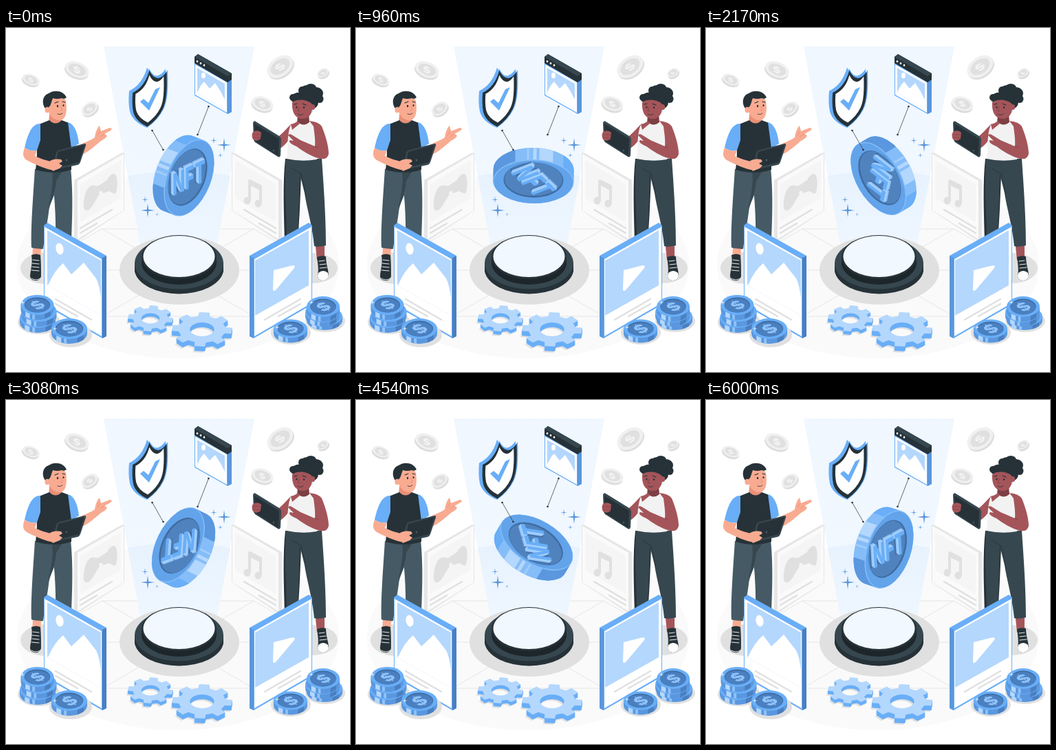
These frames come from a looping animation (500 by 500 pixels, 6040 ms). An HTML page:

```html
<!DOCTYPE html>
<html lang="en">
<head>
<meta charset="utf-8">
<title>NFT coin</title>
<style>
  html, body { margin: 0; width: 100%; height: 100%; overflow: hidden; background: #fff; }
  svg { display: block; width: 100vw; height: 100vh; }
  text { font-family: Inter, "Open Sans", sans-serif; text-anchor: middle; }
</style>
</head>
<body>
<svg id="stage" viewBox="0 0 500 500"></svg>
<script>
const PALE = '#b4d7fd', SKY = '#69aef7', MID = '#5a97de', DEEP = '#4a7fc0', NAVY = '#3f6b9f';
const INK = '#263238', SLATE = '#37474f', STEEL = '#455a64', GREY = '#e0e0e0';
const LOOP = 6040, STEPS = 145, START = 22;

const path = (d, fill, extra = '') => `<path d="${d}" fill="${fill}" ${extra}/>`;
const line = (d, color, w = 1) =>
  `<path d="${d}" fill="none" stroke="${color}" stroke-width="${w}" stroke-linecap="round" stroke-linejoin="round"/>`;
const poly = (pts, fill) => `<polygon points="${pts}" fill="${fill}"/>`;
const oval = (x, y, rx, ry, fill, extra = '') =>
  `<ellipse cx="${x}" cy="${y}" rx="${rx}" ry="${ry}" fill="${fill}" ${extra}/>`;
const group = (t, body) => `<g transform="${t}">${body}</g>`;
const mirror = body => group('translate(500 0) scale(-1 1)', body);

function floor() {
  return oval(250, 345, 234, 135, '#fafafa') +
    line('M140 292H360L470 355L360 419H140L30 355ZM140 292L360 419M360 292L140 419M30 352H470', GREY, .8);
}

function beam() {
  return path('M142 27H361L306 318H196Z', 'url(#beam)') +
    path('M177 215Q252 201 326 215L306 318H196Z', 'url(#glow)');
}

function pedestal() {
  return oval(252, 352, 87, 50, GREY) +
    path('M187 341V354A65 37 0 0 0 316 354V341Z', INK) +
    oval(251.5, 342, 64.5, 37.5, SLATE) +
    path('M197 334V341A54.5 32 0 0 0 306 341V334Z', '#1c262b') +
    oval(251.5, 333, 54.5, 32, INK) +
    oval(251.5, 332, 52, 30, '#f1f8ff');
}

function backCard(icon) {
  return poly('99,221 167,182 172,181 172,265 104,310 99,307', '#e6e6e6') +
    poly('104,222 171,183 171,265 104,307', '#fafafa') +
    poly('108,227 167,192 167,247 108,282', '#f5f5f5') +
    line('M108 291L154 264M108 298L132 284', GREY, 2.4) + icon;
}

const gamepad = path('M113 261C112 249 116 232 124 229C128 227 130 231 135 229L147 221C150 215 155 210 159 213C163 219 162 232 160 239C158 243 154 239 150 237L136 242C130 249 126 262 119 265C116 266 114 265 113 261Z', GREY) +
  oval(138, 240, 2.6, 3.2, '#f5f5f5');

const note = line('M354 251V222L370 230V254M354 226L370 234', GREY, 4) +
  oval(350.5, 251, 5, 5.5, GREY) + oval(366.5, 255, 5, 5.5, GREY);

function frontCard(icon, side) {
  return poly('55,287 60,283 146,331 146,448 140,451 55,402', SKY) +
    poly('140,334 146,331 146,448 140,451', side) +
    poly('56,289 139,336 139,448 56,400', '#fff') +
    poly('60,294 138,338 138,418 60,374', PALE) +
    line('M72 394L124 424M72 401L104 419', GREY, 2.4) + icon;
}

const landscape = oval(78, 321, 5.5, 8.5, '#fff', 'transform="rotate(-12 78 321)"') +
  path('M62 372Q70 353 83 342L95 358Q104 350 113 341L131 364Q136 373 138 394V418L60 374Z', '#fff');
const play = path('M389 352L417 345Q421 345 419 349L392 381Q388 384 388 379Z', '#fff');

// Short cylinder lying on the floor with a dollar sign on top
function token(x, y, rx, ry, h) {
  const foot = a => y + h + ry * Math.sqrt(1 - a * a);
  const stripe = (a, b, color) =>
    path(`M${x + a * rx} ${y}V${foot(a)}L${x + b * rx} ${foot(b)}V${y}Z`, color);
  return path(`M${x - rx} ${y}V${y + h}A${rx} ${ry} 0 0 0 ${x + rx} ${y + h}V${y}Z`, MID) +
    stripe(-.72, -.45, PALE) + stripe(-.3, -.15, '#8fc3fa') + stripe(.45, .8, DEEP) +
    oval(x, y, rx, ry, SKY) + oval(x, y, rx * .78, ry * .76, NAVY) + oval(x, y + .8, rx * .75, ry * .7, DEEP) +
    group(`translate(${x} ${y}) scale(1 .62) rotate(-42)`,
      `<text y="${rx * .42}" font-size="${rx * 1.12}" font-weight="800" fill="#8fc3fa">$</text>`);
}

const tokens = list => list.map(a => token(...a)).join('');

function stacks() {
  return oval(48, 428, 31, 17, GREY) + oval(94, 446, 31, 18, GREY) +
    oval(464, 426, 29, 16, GREY) + oval(414, 443, 29, 17, GREY) +
    tokens([[46, 421, 26, 15, 7], [48, 412, 25.5, 15, 7], [45.5, 402.5, 24, 14.5, 7], [92, 437, 26, 15, 7],
      [463, 419, 26, 14, 6], [460, 413, 25, 15, 6], [461, 405, 24, 15, 7], [413.5, 437, 24.5, 13.5, 7]]) +
    [[24, 399], [71, 437], [444, 399], [394, 435]].map(p => star(...p, 4, '#fff')).join('');
}

function greyCoin(x, y, rx, ry, tilt) {
  return group(`translate(${x} ${y}) rotate(${tilt})`,
    oval(0, 1.8, rx, ry, '#dcdcdc') + oval(0, -1, rx, ry, '#f0f0f0') + oval(0, -1, rx * .74, ry * .72, GREY) +
    group('scale(1 .65) rotate(-20)', `<text y="${rx * .3}" font-size="${rx}" font-weight="700" fill="#f5f5f5">$</text>`));
}

function gear(x, y, rx, ry, h, turn) {
  const ring = dy => {
    let d = '';
    for (let i = 0; i < 8; i++)
      for (const [off, r] of [[-.24, .78], [-.17, 1], [.17, 1], [.24, .78]]) {
        const a = turn + i * Math.PI / 4 + off;
        d += (d ? 'L' : 'M') + (x + rx * r * Math.cos(a)).toFixed(1) + ' ' + (y + dy + ry * r * Math.sin(a)).toFixed(1);
      }
    const hx = rx * .4, hy = ry * .4;
    return d + `ZM${x - hx} ${y + dy}a${hx} ${hy} 0 1 0 ${2 * hx} 0a${hx} ${hy} 0 1 0 ${-2 * hx} 0Z`;
  };
  let out = path(ring(h + 2), GREY, 'fill-rule="evenodd" transform="translate(-2 0)"');
  for (let dy = h; dy > 0; dy--) out += path(ring(dy), SKY, 'fill-rule="evenodd"');
  return out + path(ring(0), PALE, 'fill-rule="evenodd"');
}

function star(x, y, r, color = MID) {
  const k = r * .12;
  return path(`M${x} ${y - r}L${x + k} ${y - k}L${x + r} ${y}L${x + k} ${y + k}L${x} ${y + r}L${x - k} ${y + k}L${x - r} ${y}L${x - k} ${y - k}Z`, color);
}

function shield() {
  const d = 'M208 59Q214 71 222 71Q229 70 235 61C236 88 235 106 229 118Q221 134 205 145Q187 137 183 123C181 113 181 104 182 93Q201 84 208 59Z';
  return path(d, SKY, 'transform="translate(-3 -1.5)"') + path(d, SKY) +
    group('translate(208.8 103.5) scale(.93 .95) translate(-208.5 -103)', path(d, INK)) +
    group('translate(208.8 103.8) scale(.77 .8) translate(-208.5 -103)', path(d, '#fff')) +
    path('M195 107L200 103L207 109L217 89L224 86L208 120Z', SKY);
}

function browser() {
  return poly('274,42 279,38 328,66 328,122 322,125 274,98', SKY) +
    poly('322,70 328,66 328,122 322,125', MID) +
    poly('275,53 321,79 321,123 275,97', '#fff') +
    poly('278,58 318,81 318,118 278,94', PALE) +
    oval(287, 69, 3, 4.3, '#fff') +
    path('M278 94Q283 82 288 78L296 88L304 80Q312 91 318 104V118Z', '#fff') +
    poly('274,42 279,38 328,66 328,75 322,79 274,51', INK) +
    poly('274,42 279,38 328,66 322,70', SLATE) +
    [[278, 48.5], [283, 51.3], [288, 54.1]].map(p => oval(...p, 1.3, 1.6, '#fff')).join('');
}

function man() {
  const skin = '#f8ab91', shade = '#e98f78';
  return oval(58, 349, 37, 23, GREY) +
    path('M66 206L94 203C97 235 97 260 95 310H72C73 270 70 240 66 206Z', STEEL) +
    path('M42 205L82 207C78 232 64 250 62 268C59 290 56 305 54 321Q45 323 37 319C36 290 39 250 42 205Z', STEEL) +
    path('M67 209Q70 228 61 262Q72 240 73 222L82 208Z', SLATE) +
    path('M39 320L51 321L50 335H38Z', skin) +
    path('M37 330Q44 327 50 330C51 342 51 350 51 361Q49 368 42 367Q35 366 35 360C36 350 39 341 37 330Z', INK) +
    line('M39 337L48 338M38 342L48 343M38 347L48 348M37 352L48 353M37 364Q43 368 50 364', '#fff', .9) +
    path('M104 172C114 166 124 163 129 159C130 152 133 144 136 142L138 150L151 145Q156 146 152 149L143 154C150 156 146 160 138 164C130 171 122 178 113 183L100 184Z', skin) +
    line('M137 150L133 156M143 154L137 158', shade, .8) +
    path('M64 118L62 136Q72 145 81 135L79 126Z', shade) +
    path('M48 140L63 134Q72 143 81 134L94 139C98 160 95 180 95 206Q70 214 43 206C47 180 43 160 48 140Z', INK) +
    path('M90 137C100 140 104 152 106 168L95 175Z', SKY) +
    path('M50 139C38 139 32 152 27 174Q36 180 45 178L50 163Z', SKY) +
    path('M27 174C23 185 25 190 34 194C46 200 58 205 69 207L73 196C60 193 50 190 42 186L45 178Q36 180 27 174Z', skin) +
    path('M75 178L114 168Q117 168 116 171L108 195Q107 198 104 199L71 206Q67 207 68 203L73 181Z', SLATE) +
    path('M76 180L114 170L106 195L71 204Z', INK) + oval(88, 192, 1.4, 1.4, STEEL) +
    path('M62 195C67 190 74 190 80 191L82 194L77 197L82 200L78 204L68 208Z', skin) +
    path('M59 106C62 97 84 97 87 106C89 119 88 131 80 134C69 135 60 127 59 106Z', skin) +
    path('M58 118C51 110 53 98 62 95C70 89 84 91 88 101Q85 104 81 102Q74 104 68 102C66 107 65 113 63 114L61 118Z', INK) +
    oval(60, 119, 3.5, 4.2, skin) +
    oval(75, 113.5, 1.2, 1.7, INK) + oval(83.5, 112.5, 1.1, 1.6, INK) +
    line('M71 109L76 107M82 107L86 108', INK, 1.1) + line('M80 114L82 119L79 120', shade) +
    line('M75 125Q79 127 82 124', INK, .8);
}

function woman() {
  const skin = '#a4555a', shade = '#7d3f44';
  return oval(446, 349, 36, 22, GREY) +
    path('M406 190L430 192C428 230 428 260 424 310H405C404 270 402 225 406 190Z', INK) +
    path('M410 190L459 190C461 220 465 270 465 316Q456 320 448 317C445 285 437 262 434 240L427 212Q426 265 423 310H408C408 270 404 230 407 190Z', SLATE) +
    line('M429 212L416 204M429 212Q434 230 436 245', INK, .8) +
    path('M450 318L463 317L463 337H452Z', skin) +
    path('M452 333Q459 330 465 332C465 344 469 352 469 361Q467 367 460 367Q453 366 453 360C455 350 453 342 452 333Z', INK) +
    path('M454 356Q461 350 468 356L469 361Q467 367 460 367Q453 366 453 360Z', '#fff') +
    line('M455 339L463 338M456 344L465 343M456 349L466 348', '#fff', .9) +
    path('M415 139C408 146 403 152 397 157L370 153L366 163C380 170 390 176 400 174C408 168 414 160 416 152Z', skin) +
    path('M359 138Q360 134 363 136L397 157Q400 159 400 162L399 185Q398 189 395 187L362 166Q360 164 360 161Z', SLATE) +
    path('M361 139L397 161L396 186L362 164Z', INK) + oval(389, 178, 1.2, 1.5, STEEL) +
    path('M359 151Q366 147 371 152L370 161Q365 166 359 162Q356 156 359 151Z', skin) +
    line('M360 155L369 155M360 159L369 160', shade, .7) +
    path('M424 126L423 139Q432 148 441 137L440 125Z', shade) +
    path('M414 140L424 136Q432 145 442 136L450 139C456 145 453 160 452 191Q430 195 408 190C410 175 408 155 414 140Z', '#f2f2f2') +
    path('M414 140Q420 139 424 135L427 139L416 148Z', skin) +
    path('M441 135Q454 136 459 143C465 158 469 172 469 183Q467 192 456 190C444 187 430 178 422 172C414 169 410 165 413 163L418 164L410 156Q411 153 415 155L428 163L449 172C450 163 448 152 447 143Z', skin) +
    line('M449 172L453 174', shade, .8) +
    oval(428, 102, 14.5, 8.5, INK) + oval(438, 93, 12, 10, INK) + oval(451, 95, 10, 9, INK) +
    oval(444, 108, 10, 10, INK) + oval(430, 91, 5, 6, INK) + oval(456, 103, 5.5, 6, INK) +
    oval(417, 101, 5, 5, INK) + oval(443, 87, 8, 6, INK) +
    path('M416 108C424 102 440 104 445 111C447 123 440 133 430 132C420 131 415 122 416 108Z', skin) +
    oval(446, 115, 3.2, 4, skin) +
    oval(422.5, 115, 1.1, 1.6, INK) + oval(433, 115.5, 1.1, 1.6, INK) +
    line('M419 111L423 110M431 110L436 112', INK, 1.1) + line('M426 115L424 120L427 121', shade, .9) +
    line('M424 125Q428 128 432 125', INK, .8) + oval(445, 121, 1, 1.3, PALE);
}

function lettering() {
  const word = (dx, dy, fill) => group(`matrix(.54 -.25 0 1 ${8 + dx} ${19 + dy})`,
    `<text font-size="44" font-weight="800" fill="${fill}">NFT</text>`);
  let out = word(-5.5, -1, NAVY);
  for (let i = 5; i > 0; i--) out += word(-i * .8, -i * .6, i > 3 ? '#8ec1f7' : '#a5d0fc');
  return out + word(0, 0, SKY);
}

// Local x points out of the coin's face; the rim trails behind it
function coin() {
  const band = (y, h, fill) => `<rect x="-45" y="${y}" width="60" height="${h}" fill="${fill}"/>`;
  return '<g clip-path="url(#body)">' +
    '<rect x="-50" y="-65" width="100" height="130" fill="#85bdf8"/>' +
    band(-65, 22, SKY) + band(-28, 20, PALE) + band(-4, 5, PALE) + band(7, 3, '#9fcdfc') + band(27, 40, MID) + '</g>' +
    oval(8.5, 0, 32, 58.5, '#86bdf8') + oval(9.2, 0, 31, 57.5, '#62a3ea') +
    oval(6.5, 0, 25.5, 43.5, NAVY) + oval(5.5, 0, 24, 42, '#5083be') +
    group(`rotate(${-START})`, lettering());
}

const dot = (x, y) => oval(x, y, 1.3, 1.3, INK);

document.getElementById('stage').innerHTML =
  `<defs>
    <linearGradient id="beam" x2="0" y2="1"><stop stop-color="#f0f7fe"/><stop offset="1" stop-color="#f1f8ff"/></linearGradient>
    <linearGradient id="glow" x2="0" y2="1"><stop stop-color="#dcecfd" stop-opacity=".5"/><stop offset="1" stop-color="#e8f3fe" stop-opacity=".3"/></linearGradient>
    <clipPath id="body"><path d="M-8.5 -58.5A32 58.5 0 0 0 -8.5 58.5H8.5A32 58.5 0 0 0 8.5 -58.5Z"/></clipPath>
  </defs>` +
  floor() + beam() + backCard(gamepad) + mirror(backCard('')) + note +
  [[36, 76, 13, 7.5, 22], [103, 61.5, 18, 11, 22], [122, 118, 13, 8.5, -35], [399, 57, 21, 14, -35], [372.5, 111, 16, 10, 18], [461, 66, 9, 6, -30]]
    .map(a => greyCoin(...a)).join('') +
  pedestal() + man() + woman() +
  frontCard(landscape, DEEP) + mirror(frontCard('', MID)) + play + stacks() +
  gear(210, 422, 33, 19, 5, .15) + gear(285, 438, 44, 25, 7, .08) +
  shield() + browser() +
  '<g id="coin">' + coin() + '</g>' +
  line('M212.5 149L228.5 177M294.5 114L278.5 155', INK, .7) +
  dot(212.5, 149) + dot(228.5, 177) + dot(294.5, 114) + dot(278.5, 155) +
  star(317, 170, 10) + star(302, 163.5, 5) + star(311.5, 185, 3.5) +
  star(206, 265, 10) + star(202, 249.5, 5) + star(219.5, 271, 3);

const spinner = document.getElementById('coin');
const began = performance.now();

// Steady turn with a slight lead each time the coin lies flat
function angleAt(step) {
  const turn = step * 360 / STEPS;
  return turn + 26 + 8 * Math.cos((turn - 62) * Math.PI / 90);
}

function draw() {
  const t = (performance.now() - began) % LOOP;
  const step = Math.floor((t + 3) * STEPS / LOOP);
  spinner.setAttribute('transform', `translate(258 214.5) rotate(${angleAt(step)})`);
  requestAnimationFrame(draw);
}
draw();
</script>
</body>
</html>
```
